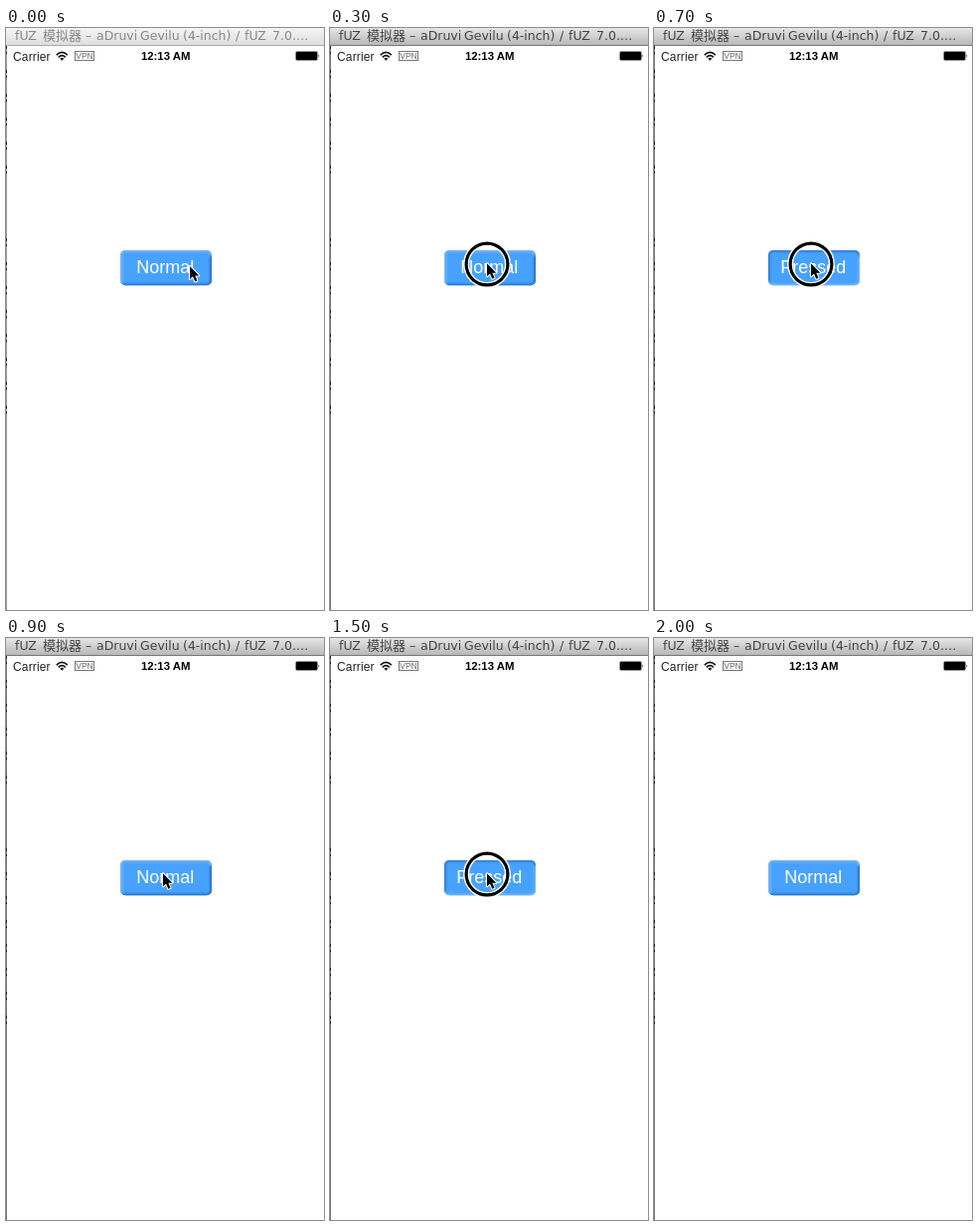
An HTML page that plays this animation: 320 by 584 pixels, repeating every 2.4 s.

```html
<!DOCTYPE html>
<html lang="en">
<head>
<meta charset="utf-8">
<title>Button states</title>
<style>
  html, body { margin: 0; width: 100%; height: 100%; overflow: hidden; background: #fff; }
  svg { display: block; width: 320px; height: 584px; }
  text { white-space: pre; }
  .title { font: 12.5px "DejaVu Sans", "Noto Sans CJK SC", "Noto Sans CJK", sans-serif; }
  .cjk { font-size: 13px; }
  .status { font: 12px "Liberation Sans", Arial, sans-serif; }
  .clock { font-size: 11.4px; font-weight: bold; }
  .vpn { font-size: 8.5px; fill: #666; }
  .label { font: 18px "Liberation Sans", Arial, sans-serif; fill: #fff; text-anchor: middle; }
</style>
</head>
<body>
<svg viewBox="0 0 320 584" xmlns="http://www.w3.org/2000/svg">
  <defs>
    <linearGradient id="barActive" x2="0" y2="1">
      <stop stop-color="#e6e6e6"/><stop offset="1" stop-color="#b8b8b8"/>
    </linearGradient>
    <linearGradient id="barIdle" x2="0" y2="1">
      <stop stop-color="#f5f5f5"/><stop offset="1" stop-color="#dedede"/>
    </linearGradient>
    <filter id="soft" x="-10%" y="-20%" width="120%" height="140%">
      <feGaussianBlur stdDeviation="1.1"/>
    </filter>
    <clipPath id="buttonClip"><rect x="115" y="223" width="92" height="35.3" rx="5"/></clipPath>
  </defs>

  <rect width="320" height="584" fill="#fff"/>
  <rect id="edge" y="18" width="1" height="566"/>
  <path id="specks" stroke="#222"/>

  <rect id="bar" width="320" height="17"/>
  <rect id="barLine" y="17" width="320" height="1"/>
  <text id="title" class="title" y="12">
    <tspan x="9">fUZ</tspan><tspan x="37" class="cjk">模拟器</tspan><tspan x="80">–</tspan><tspan x="91">aDruvi</tspan><tspan x="135">Gevilu</tspan><tspan x="178">(4-inch)</tspan><tspan x="231">/</tspan><tspan x="240">fUZ</tspan><tspan x="268">7.0.…</tspan>
  </text>

  <g class="status">
    <text x="7" y="32.5" letter-spacing=".15" fill="#222">Carrier</text>
    <path d="M50.8 27.1Q56.3 21.8 61.8 27.1M52.8 29.4Q56.3 26 59.8 29.4"
          fill="none" stroke="#111" stroke-width="1.7"/>
    <path d="M54.3 30.7Q56.3 28.9 58.3 30.7L56.3 32.8Z" fill="#111"/>
    <rect x="69.5" y="23.5" width="19" height="9" fill="none" stroke="#777"/>
    <text class="vpn" x="79" y="31.2" text-anchor="middle">VPN</text>
    <text class="clock" x="160.7" y="32" text-anchor="middle">12:13 AM</text>
    <rect x="291.5" y="23.5" width="22" height="9" rx="1.5" fill="#fff" stroke="#777" stroke-width=".8"/>
    <rect x="292" y="24" width="21" height="8" rx=".8"/>
    <path d="M314.5 26.5q1.6 1.5 0 3z"/>
  </g>

  <g clip-path="url(#buttonClip)">
    <rect x="115" y="223" width="92" height="36" fill="#47a2ff"/>
    <g id="raised" fill="none" filter="url(#soft)">
      <path d="M115.3 257V228Q115.3 223 120 223H202Q206.7 223 206.7 228" stroke="#82b6e8" stroke-width="3.6"/>
      <path d="M116 258.3H202Q207 258.3 207 253V228" stroke="#2670c4" stroke-width="3.6"/>
    </g>
    <g id="sunken" fill="none" filter="url(#soft)">
      <path d="M115 254V228Q115 223 120 223H202Q207 223 207 228" stroke="#3377c0" stroke-width="3.2"/>
      <path d="M117 258.3H202Q207 258.3 207 253V230" stroke="#7dbcff" stroke-width="2.4"/>
    </g>
  </g>
  <text id="label" class="label" x="160.3" y="246"></text>

  <g id="ring" fill="none">
    <circle cx="158" cy="237" r="20.9" stroke="#fff" stroke-width="6"/>
    <circle cx="158" cy="237" r="20.9" stroke="#000" stroke-width="3.2"/>
  </g>
  <path id="cursor" d="M0 0V13L3 10.3L5.3 15.5L7.5 14.5L5.3 9.5H9.3Z"
        stroke="#fff" stroke-width="2" paint-order="stroke" stroke-linejoin="round"/>
</svg>
<script>
const LOOP = 2400;
const ACTIVATE = 300;
const HIDE_CURSOR = 2000;
const RING_SPANS = [[300, 900], [1300, 1400], [1500, 1600]];
const PRESS_SPANS = [[700, 900], [1300, 1400], [1500, 1600]];
// Pointer positions: start time, x, y
const POINTER = [[0, 185, 239], [100, 171, 237.5], [200, 158, 236.3], [1700, 185, 239]];

const $ = id => document.getElementById(id);
const within = (spans, t) => spans.some(([from, to]) => t >= from && t < to);
const show = (id, on) => $(id).setAttribute("visibility", on ? "visible" : "hidden");
const fill = (id, color) => $(id).setAttribute("fill", color);

const marks = (first, count) =>
  Array.from({ length: count }, (_, i) => `M.5 ${first + i * 24}v3m0 3v2`).join("");
$("specks").setAttribute("d", marks(18, 6) + marks(211, 8));

function render(t) {
  const active = t >= ACTIVATE;
  const pressed = within(PRESS_SPANS, t);
  fill("bar", active ? "url(#barActive)" : "url(#barIdle)");
  fill("barLine", active ? "#777" : "#aaa");
  fill("title", active ? "#444" : "#888");
  fill("edge", active ? "#777" : "#999");

  show("raised", !pressed);
  show("sunken", pressed);
  $("label").textContent = pressed ? "Pressed" : "Normal";

  const [, x, y] = POINTER.filter(([start]) => start <= t).pop();
  $("cursor").setAttribute("transform", `translate(${x} ${y})`);
  show("cursor", t < HIDE_CURSOR);
  show("ring", within(RING_SPANS, t));
}

const began = performance.now();
function tick() {
  render((performance.now() - began) % LOOP);
  requestAnimationFrame(tick);
}
tick();
</script>
</body>
</html>
```
